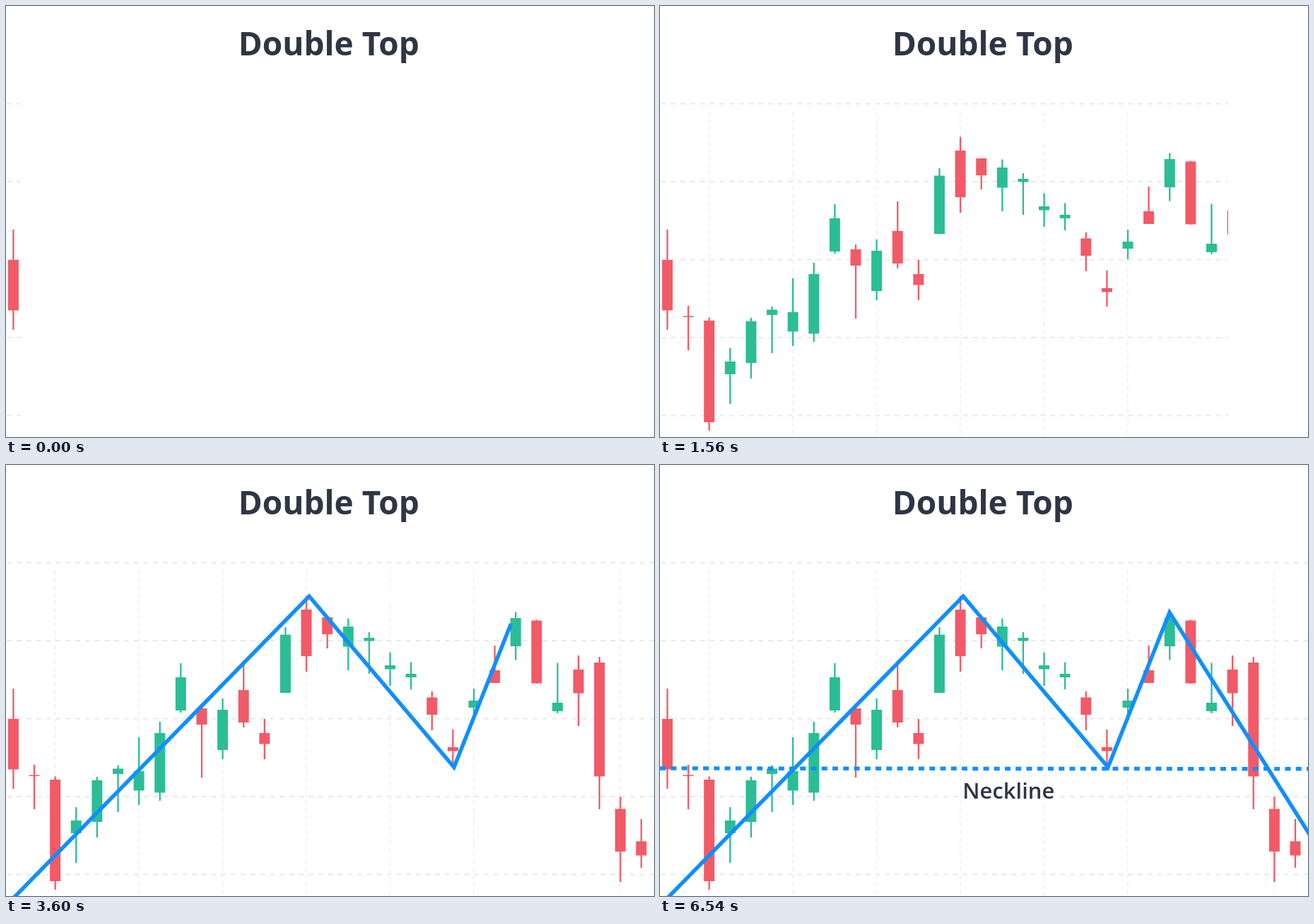
Write an HTML page that moves like this. It is 917 by 611 pixels and loops after 6.6 s.

```html
<!DOCTYPE html>
<html lang="en">
<head>
<meta charset="utf-8">
<title>Double Top</title>
<style>
  html, body { margin: 0; width: 100%; height: 100%; overflow: hidden; background: #fff; }
  svg { display: block; width: 100vw; height: 100vh; }
  text { font-family: "Open Sans", "Noto Sans", sans-serif; fill: #2e3645; }
  .grid { fill: none; stroke: #e8e9eb; }
  .rows { stroke-width: 2; stroke-dasharray: 7 6.77; }
  .cols { stroke-width: 1.6; stroke: #eeeff0; stroke-dasharray: 6 4.5; }
  .blue { fill: none; stroke: #108fff; stroke-width: 5.5; }
</style>
</head>
<body>
<svg viewBox="0 0 917 611">
  <defs>
    <clipPath id="chartClip"><rect id="chartWipe" height="611"/></clipPath>
    <clipPath id="neckClip"><rect id="neckWipe" height="611"/></clipPath>
  </defs>
  <text x="328.7" y="70" font-size="46" font-weight="700">Double Top</text>
  <g clip-path="url(#chartClip)">
    <path id="rows" class="grid rows"/>
    <path id="cols" class="grid cols"/>
    <g id="candles"></g>
  </g>
  <path id="trend" class="blue" d="M8 616.5L429 186L634 428.5L721 209L925 533"/>
  <g clip-path="url(#neckClip)">
    <path class="blue" stroke-dasharray="8 7.25" d="M0 430L920 430.8"/>
    <text x="428.3" y="472.5" font-size="31" font-weight="600">Neckline</text>
  </g>
</svg>
<script>
const LOOP = 6600, STEP = 60;
const $ = id => document.getElementById(id);

// wick top, body top, body bottom, wick bottom
const candles = [
  [317, 360, 431.5, 459], [425, 439.5, 441, 488], [441.5, 446, 590, 602],
  [485, 504, 522, 564], [442, 447, 506, 528], [426, 430.5, 438, 492],
  [386, 434, 461.5, 482], [364, 380, 464.5, 476], [281, 301, 348, 351],
  [338, 345, 368, 443], [331, 347, 404, 417], [277, 319, 365, 372],
  [360, 380, 395.5, 417], [230, 240.5, 323, 323], [185.5, 205, 271, 293],
  [216, 216, 240, 260], [217.5, 229, 257.5, 291], [237, 245, 249.5, 296],
  [265.5, 284, 289.5, 313], [279.5, 296, 301, 318], [321, 329.5, 354, 376],
  [375, 400, 405.5, 426], [317, 334, 344, 359], [256, 291, 309, 309],
  [208.5, 217, 257, 276.5], [219.5, 220.5, 309.5, 310], [280.5, 337, 349, 352],
  [270, 290, 323.5, 370], [272, 280, 441.5, 488], [470.5, 487.5, 548, 591],
  [502, 533.5, 553.5, 571]
];
const colors = "rrrggggggrgrrgrrggggrrgrgrgrrrr";

$("candles").innerHTML = candles.map(([high, top, bottom, low], i) => {
  const x = 10.4 + 29.62 * i;
  const fill = colors[i] === "r" ? "#f25a67" : "#2bbd96";
  return `<path fill="${fill}" d="M${x - 1.15} ${high}h2.3V${low}h-2.3z` +
    `M${x - 7.5} ${top}h15V${bottom}h-15z"/>`;
}).join("");

$("rows").setAttribute("d", [0, 1, 2, 3, 4].map(i => `M1.5 ${138.5 + 110.5 * i}H920`).join(""));
$("cols").setAttribute("d", [69.5, 188, 306.5, 425, 543.5, 662, 869]
  .map(x => x === 543.5 ? `M${x} 150V174M${x} 196V611` : `M${x} 150V611`).join(""));

// Smooth curve through [time, value] keys, held at both ends
function track(keys, t) {
  const last = keys.length - 1;
  if (t <= keys[0][0]) return keys[0][1];
  if (t >= keys[last][0]) return keys[last][1];
  const i = keys.findIndex(k => k[0] > t) - 1;
  const slope = n => {
    const a = keys[Math.max(0, n - 1)], b = keys[Math.min(last, n + 1)];
    return (b[1] - a[1]) / (b[0] - a[0]);
  };
  const [t0, v0] = keys[i], [t1, v1] = keys[i + 1];
  const d = t1 - t0, u = (t - t0) / d, w = 1 - u;
  return w * w * (1 + 2 * u) * v0 + u * u * (3 - 2 * u) * v1 +
    u * w * d * (w * slope(i) - u * slope(i + 1));
}

const chartKeys = [[0, 21], [720, 388], [840, 453], [1440, 749], [1560, 804], [1800, 917]];
const trendKeys = [[1980, 0], [2700, 400], [2940, 579], [3420, 997], [4140, 1545]];
const neckKeys = [[4170, 0], [4320, 101], [4860, 605], [5220, 917]];

function draw(now) {
  const t = Math.floor(now % LOOP / STEP) * STEP;
  $("chartWipe").setAttribute("width", track(chartKeys, t));
  $("neckWipe").setAttribute("width", track(neckKeys, t));
  $("trend").setAttribute("stroke-dasharray", track(trendKeys, t) + " 2000");
}

const start = performance.now();
function tick() {
  draw(performance.now() - start);
  requestAnimationFrame(tick);
}
tick();
</script>
</body>
</html>
```
